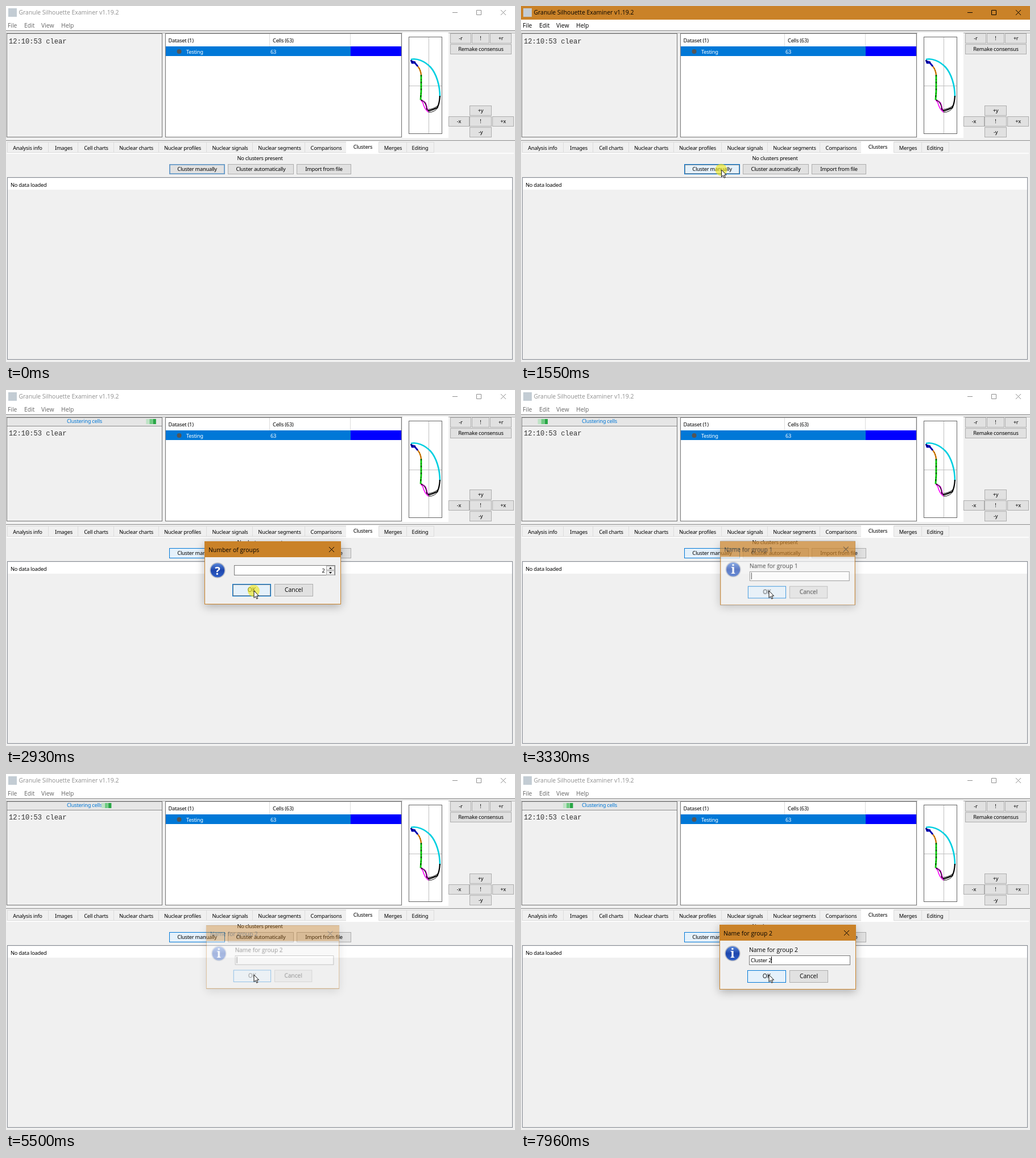
An HTML page with a canvas for the animation above (8 s loop, 895 by 626 pixels).

```html
<!DOCTYPE html>
<html>
<head>
<meta charset="utf-8">
<style>
  html, body { margin: 0; width: 100%; height: 100%; overflow: hidden; background: #f0f0f0; }
  canvas { display: block; }
</style>
</head>
<body>
<canvas id="stage" width="895" height="626"></canvas>
<script>
const LOOP = 8000, STEP = 77.2;
const UI = "9.3px 'Noto Sans', sans-serif";
const WIN = "10.4px 'Open Sans', sans-serif";
const MONO = "12.1px 'Liberation Mono', monospace";
const ORANGE = '#ca8228', BLUE = '#0078d7', HOVER = '#e5f1fb', EDGE = '#828790';

const stage = document.getElementById('stage').getContext('2d');
const layer = document.createElement('canvas').getContext('2d');
let g = stage;

function box(x, y, w, h, fill, border) {
  g.fillStyle = fill;
  g.fillRect(x, y, w, h);
  if (border) {
    g.strokeStyle = border;
    g.lineWidth = 1;
    g.strokeRect(x + .5, y + .5, w - 1, h - 1);
  }
}

function text(s, x, y, { font = UI, color = '#000', align = 'left' } = {}) {
  g.font = font;
  g.letterSpacing = font === UI ? '-0.25px' : '0px';
  g.fillStyle = color;
  g.textAlign = align;
  g.fillText(s, x, y);
}

function path(d, color, width = 1, dash = []) {
  g.strokeStyle = color;
  g.lineWidth = width;
  g.setLineDash(dash);
  g.stroke(new Path2D(d));
  g.setLineDash([]);
}

function button(label, x, y, w, h, { font = UI, hover, focus } = {}) {
  box(x, y, w, h, hover ? HOVER : '#e1e1e1', hover ? BLUE : '#adadad');
  if (focus) path(`M${x + 1.5} ${y + 1.5}h${w - 3}v${h - 3}h${3 - w}z`, '#222', 1, [1, 1]);
  text(label, x + w / 2, y + h / 2 + 3.4, { font, align: 'center' });
}

const cross = (x, y, r, color) =>
  path(`M${x - r} ${y - r}l${2 * r} ${2 * r}m0 ${-2 * r}l${-2 * r} ${2 * r}`, color);

const ease = p => p * p * (3 - 2 * p);
const clamp = p => Math.max(0, Math.min(1, p));

function drawTitle(active) {
  box(0, 0, 895, 43, '#fff');
  if (active) box(0, 0, 895, 24, ORANGE);
  const ink = active ? '#000' : '#8f8f8f';
  box(4, 4, 15, 15, '#c3ccd4');
  text('Granule Silhouette Examiner v1.19.2', 22.5, 15, { font: WIN, color: ink });
  path('M785 11.5h9', ink);
  path('M827.5 7.5h8v8h-8z', ink);
  cross(874.5, 11.5, 4.5, ink);
  [['File', 3], ['Edit', 32], ['View', 62], ['Help', 97]].forEach(([s, x]) =>
    text(s, x, 38, { font: WIN, color: active ? '#000' : '#666' }));
  box(0, 43, 895, 1, '#787878');
  box(0, 47, 895, 1, '#a8a8a8');
}

function drawLog(t, busy) {
  box(1, 48, 274, 183, '#f0f0f0', '#747474');
  if (busy) {
    box(2, 49, 272, 14, '#e6e6e6');
    box(2, 63, 272, 1, '#8c8c8c');
    text('Clustering cells', 138, 58, { color: BLUE, align: 'center' });
    const x = (t - 1625) * .2 % 294 - 17;
    g.save();
    g.beginPath();
    g.rect(2, 50, 271, 12);
    g.clip();
    ['#bfe3c6', '#6fcb82', '#28a745'].forEach((c, i) => box(x + i * 6, 51, 5.5, 9, c));
    g.restore();
  }
  text('12:10:53 clear', 5, busy ? 80 : 66, { font: MONO, color: '#333' });
}

function drawTable() {
  box(280, 48, 416, 183, '#fff', '#747474');
  box(463, 49, 1, 22, '#dcdcdc');
  box(605, 49, 1, 22, '#dcdcdc');
  box(694, 49, 1, 22, '#e8e8e8');
  text('Dataset (1)', 285.5, 64);
  text('Cells (63)', 469, 64);
  box(281, 71, 325, 17, BLUE);
  box(606, 71, 89, 17, '#00f');
  path('M289 80h9', '#2a6ca8', 1, [1, 1]);
  g.fillStyle = '#555';
  g.beginPath();
  g.arc(304.5, 80, 4, 0, 7);
  g.fill();
  text('Testing', 317, 83.5, { color: '#fff' });
  text('63', 465, 83.5, { color: '#fff' });
}

function drawConsensus() {
  box(697, 47, 81, 185, '#fff');
  box(708, 54, 59, 171, '#fff', '#666');
  path('M743.5 55v169M709 140.5h57', '#c0c0c0');
  const head = 'M712 95L714 100L719 100L724 106M713 97L720 99';
  const neck = 'M724 106Q729 112 730 121';
  const side = 'M730 121L730 150L729 165';
  const tail = 'M763 158Q762 173 758 179Q752 182 743 184.500';
  path('M712 94C722 91 736 97 746 107C757 119 763 140 763 160', '#00cfe0', 2.6);
  path(tail, '#000', 2.2);
  path('M761 173Q756 180 743 182M760 178Q754 187 743 187', '#000', .9);
  path('M729 165L733 170Q735 180 743 187', '#f0f', 1.6);
  path('M730 165L736 169Q740 175 740 181L744 185', '#000', 2);
  path('M732 166L738 170L742 183', '#f0f', 1);
  path(side, '#00c800', 2.8);
  path(side, '#000', 1.2, [3, 5, 1, 3]);
  path(neck, '#e08000', 2.4);
  path(neck, '#402000', .8, [2, 2]);
  path(head, '#00c', 2.8);
  path(head, '#000', 1, [2, 3]);
}

function drawControls() {
  [['-r', 781, 48, 37], ['!', 819, 48, 31], ['+r', 851, 48, 38], ['Remake consensus', 781, 67, 108],
   ['+y', 815, 175, 39], ['-x', 778, 194, 37], ['!', 815, 194, 39], ['+x', 855, 194, 38], ['-y', 815, 213, 39]]
    .forEach(([s, x, y, w]) => button(s, x, y, w, 18));
}

function drawTabs() {
  box(0, 236, 895, 1, '#8c8c8c');
  const tabs = ['Analysis info', 'Images', 'Cell charts', 'Nuclear charts', 'Nuclear profiles',
    'Nuclear signals', 'Nuclear segments', 'Comparisons', 'Clusters', 'Merges', 'Editing'];
  const edges = [2, 74, 126, 189, 268, 352, 433, 525, 598, 655, 704, 752];
  const centers = [38, 101.5, 158.5, 229, 310.5, 394, 481, 563, 627.5, 680.5, 728];
  box(1, 258, 892, 2, '#fcfcfc');
  tabs.forEach((s, i) => {
    const on = s === 'Clusters', w = edges[i + 1] - edges[i] + 1;
    if (on) box(edges[i], 238, w, 22, '#fff');
    else box(edges[i], 239, w, 19, '#f0f0f0', '#dcdcdc');
    text(s, centers[i], on ? 250.5 : 252.5, { align: 'center' });
  });
}

function drawClusters(t) {
  text('No clusters present', 446.5, 271, { align: 'center' });
  button('Cluster manually', 287, 278, 98, 18, { hover: t >= 1240, focus: t >= 1400 && t < 1780 });
  if (t < 70) path('M288 279h96v16h-96z', '#5a96cc', 1.6);
  button('Cluster automatically', 390, 278, 116, 18);
  button('Import from file', 511, 278, 96, 18);
  box(2, 301, 889, 321, '#f0f0f0', EDGE);
  box(3, 303, 887, 20, '#fff');
  text('No data loaded', 8, 317.5);
}

const dialogs = [
  { title: 'Number of groups', y: 266, h: 111, open: 1780, close: 3010 },
  { title: 'Name for group 1', y: 265, h: 114, open: 3150, close: 5130, entry: 'Cluster 1',
    keys: [4100, 4180, 4410, 4490, 4640, 4720, 4800, 4950, 5030] },
  { title: 'Name for group 2', y: 265, h: 114, open: 5390, close: 1e9, entry: 'Cluster 2',
    keys: [6020, 6180, 6340, 6490, 6640, 7040, 7190, 7490, 7720] },
];

function drawIcon(sign, x, y) {
  const shade = g.createLinearGradient(0, y - 14, 0, y + 14);
  shade.addColorStop(0, '#5f8fe0');
  shade.addColorStop(.5, '#1d46ad');
  shade.addColorStop(1, '#2f62cc');
  g.beginPath();
  g.arc(x, y, 13, 0, 7);
  g.fillStyle = shade;
  g.fill();
  g.strokeStyle = '#b9bdc6';
  g.lineWidth = 1.6;
  g.stroke();
  const font = sign === 'i' ? "bold 21px 'Noto Serif', serif" : "bold 20px 'Open Sans', sans-serif";
  text(sign, x, y + 7.5, { font, color: '#fff', align: 'center' });
}

function drawDialog(d, t) {
  if (t < d.open || t >= d.close + 150) return;
  layer.canvas.width = 240;
  layer.canvas.height = d.h;
  g = layer;
  g.translate(-349, -d.y);
  box(349, d.y, 240, d.h, '#f0f0f0', ORANGE);
  box(349, d.y, 240, 28, ORANGE);
  text(d.title, 356, d.y + 18.5, { font: WIN });
  cross(572.5, d.y + 14.5, 4.5, '#000');
  if (d.entry) {
    const typed = d.keys.filter(k => k <= t);
    const shown = d.entry.slice(0, typed.length);
    drawIcon('i', 372, 315.5);
    text(d.title, 401, 313, { font: WIN });
    box(401, 319, 178, 17, '#fff', '#7a7a7a');
    text(shown, 404, 331);
    const caret = Math.round(404 + g.measureText(shown).width);
    const since = t - (typed.at(-1) ?? d.open);
    if (since % 1000 < 500) box(caret, 321, 1, 12, '#000');
  } else {
    drawIcon('?', 372, 317);
    box(401, 308, 178, 18, '#fff', '#7a7a7a');
    text('2', 560.5, 320.5, { align: 'right' });
    for (const [y, dir] of [[309, -1], [317.5, 1]]) {
      box(563, y, 15, 8, '#f0f0f0', '#adadad');
      g.fillStyle = '#000';
      g.fill(new Path2D(`M568 ${y + 4 - dir * 1.5}h5l-2.5 ${dir * 3}z`));
    }
  }
  const y = d.entry ? 345 : 341;
  button('OK', 398, y, 68, 22, { font: WIN, hover: true, focus: !d.entry });
  button('Cancel', 472, y, 68, 22, { font: WIN });

  g = stage;
  const shown = t < d.close ? clamp((t - d.open) / 250) : clamp(1 - (t - d.close) / 150);
  const scale = .96 + .04 * shown;
  g.save();
  g.globalAlpha = shown;
  g.translate(469, d.y + d.h / 2);
  g.scale(scale, scale);
  // The shadow falls only outside the window, so it does not show through a fade.
  g.save();
  const outside = new Path2D();
  outside.rect(-200, -150, 400, 300);
  outside.rect(-120, -d.h / 2, 240, d.h);
  g.clip(outside, 'evenodd');
  g.shadowColor = 'rgba(0,0,0,.28)';
  g.shadowBlur = 15;
  g.shadowOffsetY = 4;
  g.fillRect(-120, -d.h / 2, 240, d.h);
  g.restore();
  g.drawImage(layer.canvas, -120, -d.h / 2);
  g.restore();
}

function drawCursor(t) {
  if (t < 530) return;
  const enter = 1 - (1 - clamp((t - 530) / 790)) ** 2;
  const toOk = ease(clamp((t - 1950) / 650));
  const x = 600 - 248 * enter + 83.5 * toOk;
  const y = 566 - 278 * enter + 65 * toOk;
  if (t >= 1400 && t < 1700 || t >= 2850 && t < 3100) {
    g.fillStyle = 'rgba(240,230,20,.62)';
    g.beginPath();
    g.arc(x, y, 10.5, 0, 7);
    g.fill();
  }
  const arrow = new Path2D(`M${x + .5} ${y}v12.5l2.8-2.6 2 4.4 2-.9-2-4.3h3.8z`);
  g.fillStyle = '#fff';
  g.fill(arrow);
  g.strokeStyle = '#111';
  g.lineWidth = 1;
  g.stroke(arrow);
}

function draw(now) {
  const clock = now % LOOP;
  // The screen is sampled at a steady interval once the pointer is active.
  const t = clock < 530 ? clock : 1552 + Math.floor((clock - 1550) / STEP + .15) * STEP;
  const active = t >= 1550 && t < 1780 || t >= 5210 && t < 5390;
  box(0, 0, 895, 626, '#f0f0f0');
  drawTitle(active);
  drawLog(t, t >= 1625);
  drawConsensus();
  drawTable();
  drawControls();
  drawTabs();
  drawClusters(t);
  dialogs.forEach(d => drawDialog(d, t));
  drawCursor(t);
}

(function frame() {
  draw(performance.now());
  requestAnimationFrame(frame);
})();
</script>
</body>
</html>
```
